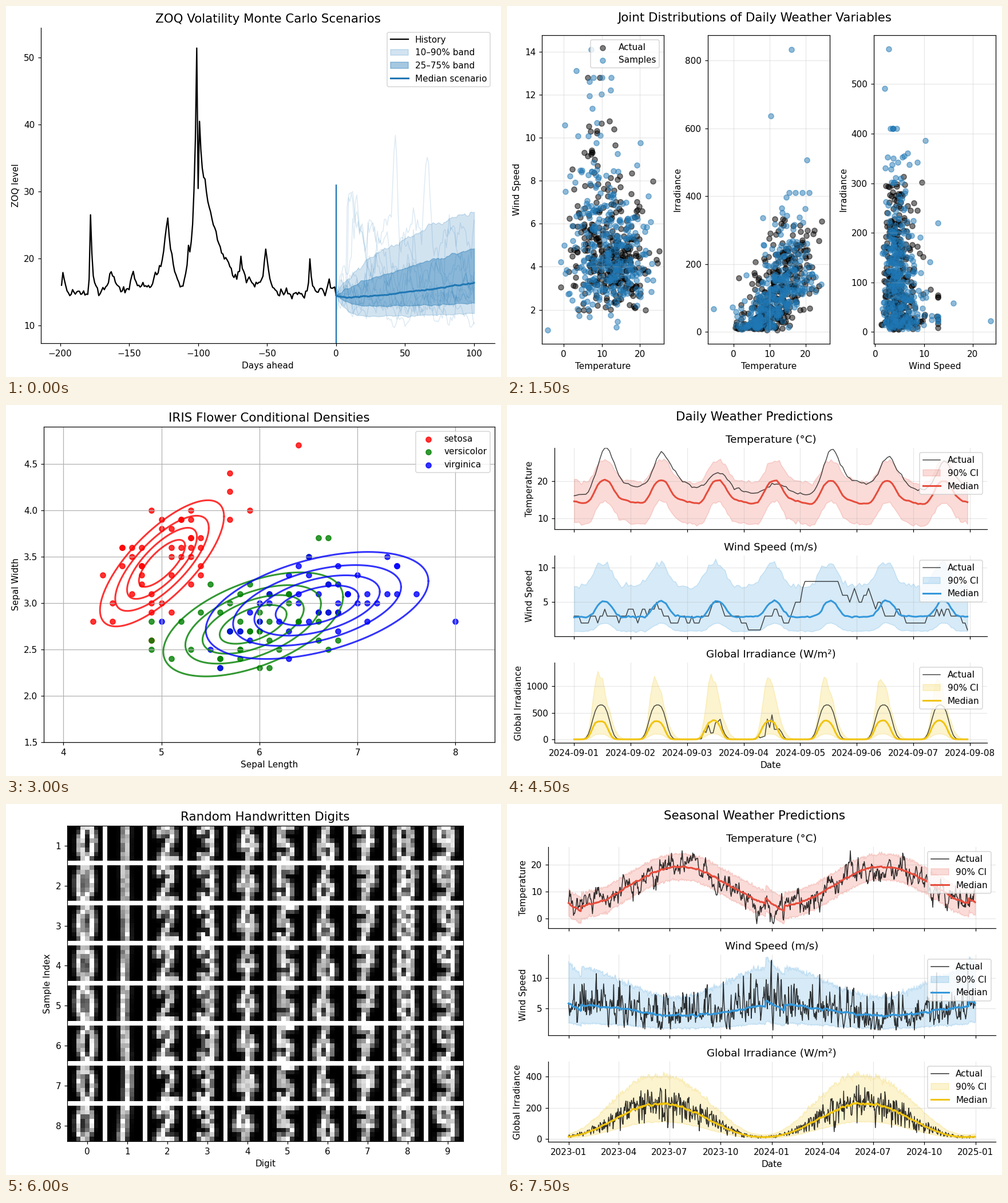
A matplotlib script that plays this animation: 865x648 px, repeating every 9 s.

```python
import numpy as np
import matplotlib.pyplot as plt
from matplotlib.animation import FuncAnimation

W, H, DPI = 865, 648, 110
BLUE = "#1f77b4"
plt.rcParams["font.family"] = "DejaVu Sans"
fig = plt.figure(figsize=((W + 0.001) / DPI, (H + 0.001) / DPI), dpi=DPI,
                 facecolor="white")
rng = np.random.default_rng(7)


def panel(box, xlim, ylim, xticks, yticks, xlabel="", ylabel="", is_open=False):
    """Axes placed by its pixel box (left, top, right, bottom)."""
    x0, y0, x1, y1 = box
    ax = fig.add_axes([x0 / W, 1 - y1 / H, (x1 - x0) / W, (y1 - y0) / H])
    ax.set(xlim=xlim, ylim=ylim, xticks=xticks, yticks=yticks,
           xlabel=xlabel, ylabel=ylabel)
    if is_open:
        ax.spines[["top", "right"]].set_visible(False)
    return ax


def heading(text):
    return fig.text(0.5, 1 - 0.1 * DPI / H, text, ha="center", va="top", fontsize=14)


def smooth_noise(n, keep, size):
    """Autocorrelated noise with standard deviation `size`, starting at zero."""
    out = np.zeros(n)
    for i in range(1, n):
        out[i] = keep * out[i - 1] + rng.normal()
    return out * size * np.sqrt(1 - keep ** 2)


def bell(x, centre, width, power=2.0):
    return np.exp(-np.abs((x - centre) / width) ** power)


def settle(t, tau):
    return 1 - np.exp(-t / tau)


# ---- volatility scenarios ----

# day, height, days to rise, days to fall
SHOCKS = [(-198, 3, 1, 2), (-178, 13, 0.7, 1.5), (-163, 3.5, 5, 4), (-147, 3, 1.5, 2),
          (-122, 11, 6, 4), (-107, 4, 1.5, 1.5), (-101, 36, 2.2, 1), (-99, 22, 0.5, 13),
          (-69, 3.5, 1.5, 2), (-51, 6, 2.5, 2.5), (-19, 5, 0.8, 1.5), (-5, 1.8, 1, 0.6)]


def history(days):
    level = 14.9 + smooth_noise(days.size, 0.6, 0.55)
    for day, height, rise, fall in SHOCKS:
        gap = days - day
        level = level + height * np.exp(-np.where(gap < 0, -gap / rise, gap / fall))
    level[-1] = 14.5
    return level


def scenario(t):
    """Mean-reverting random path with rare upward jumps."""
    log = [np.log(14.5)]
    for _ in t[1:]:
        jump = rng.exponential(0.2) if rng.random() < 0.04 else 0
        log.append(log[-1] + 0.05 * (np.log(14) - log[-1]) + rng.normal(0, 0.055) + jump)
    return 9.6 + np.abs(np.exp(log) - 9.6)


def volatility():
    ax = panel((61, 38, 854, 589), (-213.95, 114.95), (7.35, 54.44),
               range(-200, 101, 50), range(10, 51, 10),
               "Days ahead", "ZOQ level", True)
    ax.set_title("ZOQ Volatility Monte Carlo Scenarios", fontsize=14)
    days = np.arange(-199, 1)
    ax.plot(days, history(days), color="black", label="History")

    t = np.arange(101)
    s = t / 100
    q10 = 14.5 - 3.1 * settle(t, 6) + 0.4 * s ** 2 + smooth_noise(101, 0.7, 0.07)
    q25 = 14.5 - 1.7 * settle(t, 9) + 0.6 * s ** 2 + smooth_noise(101, 0.7, 0.07)
    q50 = 14.5 - 0.5 * settle(t, 5) + 2.4 * s ** 1.3 + smooth_noise(101, 0.7, 0.06)
    q75 = 14.5 + 6.9 * s ** 0.72 + smooth_noise(101, 0.7, 0.13)
    q90 = 14.5 + np.minimum(13 * s ** 0.63, 12.2) + smooth_noise(101, 0.7, 0.22)

    paths = [scenario(t) for _ in range(9)]
    paths.append(14.5 + 11 * bell(t, 36, 9) + 16 * bell(t, 43, 2) + 10 * bell(t, 58, 12)
                 + 12 * bell(t, 66, 3) + 11 * bell(t, 82, 9) + smooth_noise(101, 0.5, 1.3))
    for path in paths:
        ax.plot(t, path, color=BLUE, alpha=0.15, lw=1)
    ax.fill_between(t, q10, q90, color=BLUE, alpha=0.2, label="10–90% band")
    ax.fill_between(t, q25, q75, color=BLUE, alpha=0.4, label="25–75% band")
    ax.plot(t, q50, color=BLUE, lw=2, label="Median scenario")
    ax.axvline(0, 0, 0.5, color=BLUE)
    ax.legend(loc="upper right")
    return [ax]


# ---- joint weather scatter ----

def weather_draw(n, sampled):
    """Random days as temperature, wind and irradiance."""
    summer = (1 - np.cos(rng.uniform(0, 2 * np.pi, n))) / 2
    temp = 6.5 + 10.5 * summer + rng.normal(0, 3.2, n)
    wind = (5 - 0.7 * summer) * np.exp(rng.normal(0, 1, n) * (0.44 - 0.12 * summer))
    if sampled:
        factor = np.exp(rng.normal(-0.08, 0.42, n))
    else:
        factor = rng.uniform(0.3, 1.5, n)
    irr = (15 + 210 * summer) * factor
    return np.clip(temp, -2.5, 25), np.clip(wind, 1.2, 12.8), np.clip(irr, 5, 410)


def joint():
    temp = ("Temperature", 0, (0, 10, 20))
    wind = ("Wind Speed", 1, (0, 10, 20))
    irr = ("Irradiance", 2, range(0, 801, 100))
    specs = [(61, temp, (-5.71, 26.24), wind, (0.417, 14.76), range(2, 15, 2),
              [(7.2, 14.1), (3.3, 13.1), (6.7, 12.6), (-4.2, 1.05)]),
             (351, temp, (-7.06, 26.67), irr, (-35.5, 875), range(0, 801, 200),
              [(16, 833), (10.3, 636), (20.3, 506), (-5.4, 67)]),
             (641, wind, (-0.29, 24.7), irr, (-23.7, 598.7), range(0, 501, 100),
              [(2.8, 571), (1.9, 491), (23.6, 23), (16, 58)])]
    axes = []
    for left, (xname, i, xticks), xlim, (yname, j, _), ylim, yticks, far in specs:
        ax = panel((left, 51, left + 213, 590), xlim, ylim, xticks, yticks, xname, yname)
        actual, samples = weather_draw(330, False), weather_draw(330, True)
        fx, fy = np.transpose(far)
        ax.scatter(actual[i], actual[j], color="black", alpha=0.5, label="Actual")
        ax.scatter(np.r_[samples[i], fx], np.r_[samples[j], fy], color=BLUE,
                   alpha=0.5, label="Samples")
        ax.grid(alpha=0.3)
        axes.append(ax)
    axes[0].legend(loc="upper right")
    return axes + [heading("Joint Distributions of Daily Weather Variables")]


# ---- flower densities ----

# name, colour, means, deviations, correlation
SPECIES = [("setosa", "red", (5.006, 3.428), (0.3525, 0.379), 0.7425),
           ("versicolor", "green", (5.936, 2.77), (0.511, 0.3125), 0.526),
           ("virginica", "blue", (6.588, 2.974), (0.633, 0.3215), 0.457)]


def flowers():
    ax = panel((66, 38, 854, 589), (3.8, 8.4), (1.5, 4.9), range(4, 9),
               np.arange(1.5, 4.6, 0.5), "Sepal Length", "Sepal Width")
    ax.set_title("IRIS Flower Conditional Densities", fontsize=14)
    a = np.linspace(0, 2 * np.pi, 121)
    for name, color, (mx, my), (sx, sy), r in SPECIES:

        def place(u, v):
            return mx + sx * u, my + sy * (r * u + np.sqrt(1 - r * r) * v)

        x, y = place(*rng.normal(size=(2, 48)))
        ax.scatter(np.round(x, 1), np.round(y, 1), color=color, alpha=0.8, label=name)
        for level in (0.2, 0.4, 0.6, 0.8):
            k = np.sqrt(-2 * np.log(level))
            ax.plot(*place(k * np.cos(a), k * np.sin(a)), color=color, lw=2, alpha=0.8)
    ax.grid()
    ax.legend(loc="upper right")
    return [ax]


# ---- weather predictions ----

ROWS = [("Temperature (°C)", "Temperature", "#e74c3c", 75.5, 216.6),
        ("Wind Speed (m/s)", "Wind Speed", "#3498db", 263.4, 404),
        ("Global Irradiance (W/m²)", "Global Irradiance", "#f1c40f", 450.5, 590.4)]


def predictions(title, left, right, x, xlim, dates, limits, data, alpha):
    ticks = (dates - dates[0]).astype("timedelta64[D]").astype(int)
    axes = []
    for row, (ylim, yticks), (actual, low, mid, high) in zip(ROWS, limits, data):
        head, name, color, top, bottom = row
        ax = panel((left, top, right, bottom), xlim, ylim, ticks, yticks,
                   ylabel=name, is_open=True)
        ax.set_title(head, fontsize=12)
        ax.plot(x, actual, color="black", lw=1, alpha=alpha, label="Actual")
        ax.fill_between(x, low, high, color=color, alpha=0.2, label="90% CI")
        ax.plot(x, mid, color=color, lw=2, label="Median")
        ax.grid(alpha=0.3)
        ax.legend(loc="upper right")
        ax.tick_params(labelbottom=False)
        axes.append(ax)
    return axes + [heading(title)]


def label_dates(axes, names):
    last = axes[-2]
    last.set_xticks(last.get_xticks(), names)
    last.tick_params(labelbottom=True)
    last.set_xlabel("Date")
    return axes


def daily():
    t = np.arange(168)
    h, day = t % 24, t // 24

    def noise(size):
        return rng.normal(0, size, t.size)

    nights = [16, 18.3, 18, 16.8, 16.2, 18.8, 17]
    peaks = [27.8, 27.6, 23, 19.7, 27.4, 27, 25]
    temp = np.interp(t, 24 * np.arange(7) + 5, nights) + smooth_noise(168, 0.6, 0.35)
    for d in range(7):
        gap = t - 24 * d - 13.5
        temp = temp + (peaks[d] - nights[d]) * np.where(
            gap < 0, bell(gap, 0, 5, 2), bell(gap, 0, 6, 1.6))
    t_mid = (14.5 + 5.6 * bell(h, 12.5, 4.8, 2.6) - 0.6 * np.sin(np.pi * h / 12)
             - 0.05 * day + noise(0.08))

    w_mid = 2.9 + 2.25 * bell(h, 12.8, 4.2, 2.6) + noise(0.07)
    w_high = 7.4 + 3.3 * bell(h, 12, 5, 2.6) + noise(0.25)
    wind = 3 + 3.6 * bell(t, 112, 15, 4) + bell(h, 12, 4) + smooth_noise(168, 0.85, 1.1)

    i_mid = 350 * bell(h, 11, 4, 3) * (1 + noise(0.02))
    i_high = 1180 * np.where(h < 10, bell(h, 10, 2.8), bell(h, 10, 5.2))
    i_high = i_high * (1 + noise(0.04)) * np.where(day == 0, 1.13, 1)
    cloudy = (day == 2) | (day == 3)
    irr = 650 * bell(h, 11.4, 4.3, 2.9) * np.where(cloudy, rng.uniform(0.1, 0.75, 168), 1)

    dates = np.arange("2024-09-01", "2024-09-09", dtype="datetime64[D]")
    axes = predictions(
        "Daily Weather Predictions", 83, 839, t / 24, (-0.348, 7.306), dates,
        [((7.08, 28.77), (10, 20)), ((0.08, 11.7), (5, 10)),
         ((-70, 1443), (0, 500, 1000))],
        [(temp, t_mid - 5.7 + noise(0.25), t_mid, t_mid + 5.6 + noise(0.3)),
         (np.clip(np.round(wind), 1, 8), w_mid * 0.5 - 0.6 + noise(0.05), w_mid, w_high),
         (irr, i_mid * 0.3, i_mid, i_high)], 0.7)
    return label_dates(axes, dates)


def seasonal():
    t = np.arange(731)
    d = t % 365

    def wave(peak):
        return np.cos(2 * np.pi * (d - peak) / 365)

    def noise(size):
        return rng.normal(0, size, t.size)

    # New-year ramp: rises late in December, drops, then snaps back.
    k = (d + 11) % 365
    ramp = np.where(k < 34, 1 - k / 17, 0)

    t_mid = 12 + 7.3 * wave(200) + 2 * ramp + smooth_noise(731, 0.8, 0.2)
    temp = np.clip(t_mid + smooth_noise(731, 0.75, 2.8), -2, 25.2)
    w_mid = 4.7 + 0.85 * wave(20) + ramp + smooth_noise(731, 0.8, 0.1)
    w_high = 9.4 + 2.5 * wave(8) + 1.6 * ramp + noise(0.25)
    wind = w_mid * np.exp(smooth_noise(731, 0.45, 0.39))
    wind = np.clip(wind, 1.5, w_high * 1.06)
    light = ((1 + wave(167)) / 2) ** 1.1
    i_mid = (14 + 214 * light) * (1 + smooth_noise(731, 0.7, 0.02))
    irr = np.minimum(i_mid * rng.triangular(0.25, 1.25, 1.6, 731), 352)
    i_high = i_mid * (2 + 0.2 * wave(0)) * (1 + noise(0.025))

    dates = np.arange("2023-01", "2025-02", 3, dtype="datetime64[M]")
    axes = predictions(
        "Seasonal Weather Predictions", 72, 853.5, t, (-36.5, 766.5),
        dates.astype("datetime64[D]"),
        [((-3.6, 26.5), (0, 10, 20)), ((0.65, 13.8), (5, 10)),
         ((-18, 495), (0, 200, 400))],
        [(temp, t_mid - 4.7 + noise(0.25), t_mid, t_mid + 4.9 + noise(0.3)),
         (wind, w_mid * 0.47 + noise(0.08), w_mid, w_high),
         (irr, i_mid * 0.5, i_mid, i_high)], 0.8)
    return label_dates(axes, dates)


# ---- handwritten digits ----

def arc(cy, ry, start, stop):
    a = np.radians(np.linspace(start, stop, 60))
    return np.c_[3.55 + 1.4 * np.cos(a), cy + ry * np.sin(a)]


def line(*pts):
    p = np.array(pts, float)
    k = np.linspace(0, len(p) - 1, 60)
    return np.c_[[np.interp(k, range(len(p)), col) for col in p.T]].T


def upper(start=0, stop=360):
    return arc(1.7, 1.7, start, stop)


def lower(start=0, stop=360):
    return arc(5.2, 1.8, start, stop)


STROKES = [
    [arc(3.5, 3.5, 0, 360)],
    [line((3.5, 0), (3.5, 7))],
    [upper(190, 390), line((4.8, 2.5), (2.3, 7), (5.3, 7))],
    [upper(200, 450), lower(270, 510)],
    [line((3.6, 0), (2.2, 4.3), (5.2, 4.3)), line((4.6, 2.5), (3.8, 7))],
    [line((5.2, 0), (2.7, 0), (2.5, 3.4)), lower(230, 500)],
    [line((3.6, 0), (2.2, 5)), lower()],
    [line((2.2, 0.3), (5, 0.3), (3, 7)), line((2.4, 3.6), (5, 3.4))],
    [upper(), lower()],
    [upper(), line((4.9, 1.7), (4.8, 5.5), (3.8, 7), (2.4, 6.8))]]


def draw_digit(strokes):
    yy, xx = np.mgrid[0:8, 0:8]
    x, y = np.concatenate(strokes).T
    x = x + rng.normal(0, 0.2) + rng.normal(0, 0.06) * (3.5 - y)
    y = y + rng.normal(0, 0.15) * np.sin(x)
    gap = np.hypot(xx[..., None] - x, yy[..., None] - y).min(axis=2)
    ink = 1.15 * bell(gap, 0, rng.uniform(0.75, 1)) * rng.uniform(0.65, 1.05, (8, 8))
    return np.clip(ink, 0, 1)


def digits():
    sheet = np.ones((71, 89))
    for r in range(8):
        for c in range(10):
            sheet[r * 9:r * 9 + 8, c * 9:c * 9 + 8] = draw_digit(STROKES[c])
    ax = panel((107, 38, 799, 589), (-0.5, 88.5), (70.5, -0.5), [], [])
    ax.imshow(sheet, cmap="gray", vmin=0, vmax=1, aspect="auto", interpolation="nearest")
    ax.set_xticks(np.arange(10) * 9 + 4, range(10))
    ax.set_yticks(np.arange(8) * 9 + 4, range(1, 9))
    ax.set(xlabel="Digit", ylabel="Sample Index")
    ax.set_title("Random Handwritten Digits", fontsize=14)
    return [ax]


scenes = [make() for make in (volatility, joint, flowers, daily, digits, seasonal)]


def show(frame):
    for i, parts in enumerate(scenes):
        for part in parts:
            part.set_visible(i == frame)
    return []


anim = FuncAnimation(fig, show, frames=len(scenes), init_func=lambda: show(0),
                     interval=1500, repeat=True, repeat_delay=0, blit=False)
plt.show()
```
